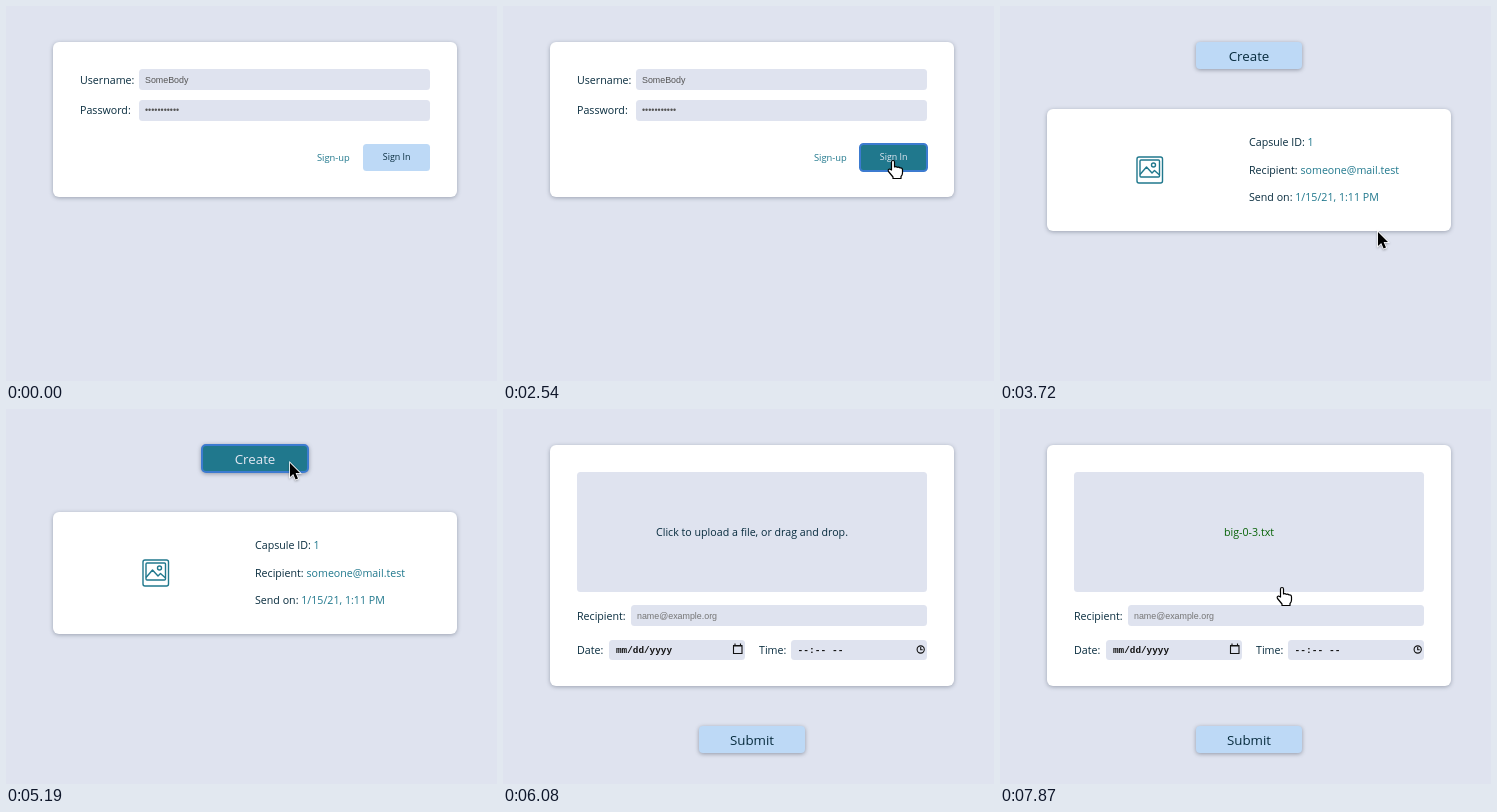
An HTML page for the animation above (8 s loop, 491x375 px).

```html
<!DOCTYPE html>
<html lang="en">
<head>
<meta charset="utf-8">
<title>Time capsule demo</title>
<style>
  html, body { margin: 0; width: 100%; height: 100%; overflow: hidden; background: #dfe3ef; }
  svg { display: block; width: 100%; height: 100%; }
  text { font: 10.67px "Open Sans", "Noto Sans", sans-serif; fill: #082c3e; white-space: pre; }
  .card { fill: #fff; filter: drop-shadow(0 1px 2px rgba(30, 40, 60, .35)); }
  .field { fill: #dfe3ef; }
  .value { font: 8.89px "Liberation Sans", Arial, sans-serif; fill: #555; }
  .hint { fill: #757575; }
  .mono { font: bold 9.33px "Liberation Mono", "Courier New", monospace; fill: #111; }
  .time { font-size: 9.6px; }
  .teal { fill: #20788d; }
  .small { font-size: 9.33px; }
  .mid { text-anchor: middle; }
  .button rect { fill: #bdd9f6; }
  .button text { font-size: 13.33px; text-anchor: middle; }
  .raised rect { filter: drop-shadow(0 1px 2px rgba(30, 40, 60, .4)); }
  #signIn text { font-size: 8.89px; }
  .button.hot rect { fill: #20788d; }
  .button.hot text { fill: #e3e8f2; }
  .button.focus rect { stroke: #3c7bd0; stroke-width: 2; }
  .line { fill: none; stroke: #20788d; stroke-width: 1.4; stroke-linejoin: round; }
  .ink { fill: none; stroke: #111; stroke-width: 1.1; }
  .done { fill: #076307; }
  .label { font: 700 12px Inter, "Open Sans", sans-serif; fill: #fff; text-anchor: middle; }
  .sheet { fill: #fafafa; filter: drop-shadow(0 1px 3px rgba(0, 0, 0, .45)); }
  .type { font: 9px Inter, "Open Sans", sans-serif; fill: #777; text-anchor: middle; }
  #arrow { fill: #000; stroke: #fff; stroke-width: 1.6; paint-order: stroke; filter: drop-shadow(0 1px 1px rgba(0, 0, 0, .3)); }
  #hand { fill: #fff; stroke: #000; stroke-width: 1.2; stroke-linejoin: round; }
</style>
</head>
<body>
<svg viewBox="0 0 491 375">
  <rect width="491" height="375" fill="#dfe3ef"/>

  <g class="scene">
    <rect class="card" x="47" y="36" width="404" height="155" rx="6"/>
    <text x="74" y="78">Username:</text>
    <rect class="field" x="133" y="63" width="291" height="21" rx="3.5"/>
    <text class="value" x="139" y="77">SomeBody</text>
    <text x="74" y="108">Password:</text>
    <rect class="field" x="133" y="94" width="291" height="21" rx="3.5"/>
    <text class="value" x="139" y="107">•••••••••••</text>
    <text class="teal small" x="311" y="155">Sign-up</text>
    <g class="button" id="signIn">
      <rect x="357" y="138" width="67" height="27" rx="3.5"/>
      <text x="390.7" y="154">Sign In</text>
    </g>
  </g>

  <g class="scene">
    <g class="button raised" id="create">
      <rect x="196" y="36" width="106" height="27" rx="4"/>
      <text x="249" y="55">Create</text>
    </g>
    <rect class="card" x="47" y="103" width="404" height="122" rx="6"/>
    <g class="line">
      <rect x="137" y="151" width="25.5" height="26" rx="2"/>
      <rect x="140" y="154" width="19.5" height="17" rx="1"/>
      <path d="M140 168.5 146.5 161 152 167 154.5 164.5 159.5 169"/>
      <circle cx="153.5" cy="159" r="2"/>
    </g>
    <text x="249" y="140">Capsule ID: <tspan class="teal">1</tspan></text>
    <text x="249" y="168">Recipient: <tspan class="teal">someone@mail.test</tspan></text>
    <text x="249" y="195">Send on: <tspan class="teal">1/15/21, 1:11 PM</tspan></text>
  </g>

  <g class="scene">
    <rect class="card" x="47" y="36" width="404" height="241" rx="6"/>
    <rect class="field" x="74" y="63" width="350" height="120" rx="3.5"/>
    <text class="mid" id="prompt" x="249" y="127">Click to upload a file, or drag and drop.</text>
    <text class="mid done" id="dropped" x="249" y="127">big-0-3.txt</text>
    <text x="74" y="211">Recipient:</text>
    <rect class="field" x="128" y="196" width="296" height="21" rx="3.5"/>
    <text class="value hint" x="134" y="210">name@example.org</text>
    <text x="74" y="245">Date:</text>
    <rect class="field" x="106" y="231" width="136" height="20" rx="3.5"/>
    <text class="mono" x="113" y="244">mm/dd/yyyy</text>
    <path class="ink" d="M230.5 237h8.5v7.5h-8.5zM230 236.5h9.5M232 234.5v2M237.5 234.5v2"/>
    <text x="256" y="245">Time:</text>
    <rect class="field" x="288" y="231" width="136" height="20" rx="3.5"/>
    <text class="mono time" x="294.5" y="244">--:-- --</text>
    <circle class="ink" cx="417.7" cy="240.5" r="3.6"/>
    <path class="ink" d="M417.7 238v2.8h2"/>
    <g class="button raised">
      <rect x="196" y="317" width="106" height="27" rx="4"/>
      <text x="249" y="336">Submit</text>
    </g>
  </g>

  <g id="file">
    <circle cx="-2" cy="-12" r="32" fill="#555" opacity=".05"/>
    <path class="sheet" d="M-25-40H6L21-25V21H-25Z"/>
    <path d="M6-40V-27Q6-25 8-25H21Z" fill="#ddd"/>
    <path d="M-21-36H3M-21-33H1M-21-30H4M-21-27H2M-21-24H4M-21-21H-2" stroke="#bbb" stroke-dasharray="7 1 4 1" fill="none"/>
    <text class="type" x="-1" y="17">TXT</text>
    <rect x="-40" y="29" width="75" height="17" rx="2.5" fill="#4f82db"/>
    <text class="label" x="-2.5" y="42">big-0-3.txt</text>
  </g>
  <path id="arrow" d="M0 0V14L3.2 11 5.6 16.5 8 15.5 5.6 10H10Z"/>
  <path id="hand" d="M-1.5 9V1Q-1.5-.5 0-.5T1.5 1V6Q3 5 4.3 6.3 6 5.6 7 7 9.5 6.5 9.5 9V12Q9.5 14 8 15.5V17.5H0V16L-4.5 10.5Q-5.5 8.5-3.5 8Z"/>
</svg>
<script>
  const LOOP = 8000;
  const FOCUS_SIGN_IN = 2540, LIST = 2690, FOCUS_CREATE = 5190, FORM = 5340, DRAG = 7280, DROP = 7870;

  // Pointer stops: time, x, y; a stop without a place hides the pointer.
  const stops = [
    [0],
    [1200, 403, 329], [1350, 402, 288], [1490, 398, 235], [1640, 394, 190],
    [1790, 391, 163], [1940, 390, 157], [2090, 390, 155],
    [2980, 393, 157], [3130, 402, 172], [3280, 405, 194], [3430, 397, 214], [3570, 385, 224], [3720, 378, 226],
    [4010, 366, 200], [4160, 325, 122], [4300, 290, 62], [4450, 284, 54],
    [5340, 285, 57], [5490, 288, 75], [5640, 296, 130], [5780, 304, 210], [5930, 311, 298], [6080],
    [DRAG, 297, 267], [7430, 291, 232], [7570, 284, 193], [7720, 282, 179]
  ];

  const $ = id => document.getElementById(id);
  const scenes = document.querySelectorAll('.scene');
  const show = (el, on) => { el.style.display = on ? '' : 'none'; };
  const place = (el, on, x, y) => {
    show(el, on);
    if (on) el.setAttribute('transform', `translate(${x} ${y})`);
  };

  function draw(now) {
    const t = now % LOOP;
    const scene = t < LIST ? 0 : t < FORM ? 1 : 2;
    const [, x, y] = stops.findLast(stop => stop[0] <= t);
    const visible = x !== undefined;
    const dragging = t >= DRAG && t < DROP;
    const onSignIn = visible && scene === 0 && y < 165;
    const onCreate = visible && scene === 1 && y < 64;
    const onUpload = visible && scene === 2 && y > 63 && y < 183 && !dragging;
    const pointing = onSignIn || onUpload;

    scenes.forEach((el, i) => show(el, i === scene));
    $('signIn').classList.toggle('hot', onSignIn);
    $('signIn').classList.toggle('focus', t >= FOCUS_SIGN_IN);
    $('create').classList.toggle('hot', onCreate);
    $('create').classList.toggle('focus', t >= FOCUS_CREATE);
    show($('prompt'), t < DROP);
    show($('dropped'), t >= DROP);
    place($('file'), dragging, x, y);
    place($('arrow'), visible && !pointing, x, y);
    place($('hand'), pointing, x, y);
  }

  function tick() {
    draw(performance.now());
    requestAnimationFrame(tick);
  }
  tick();
</script>
</body>
</html>
```
